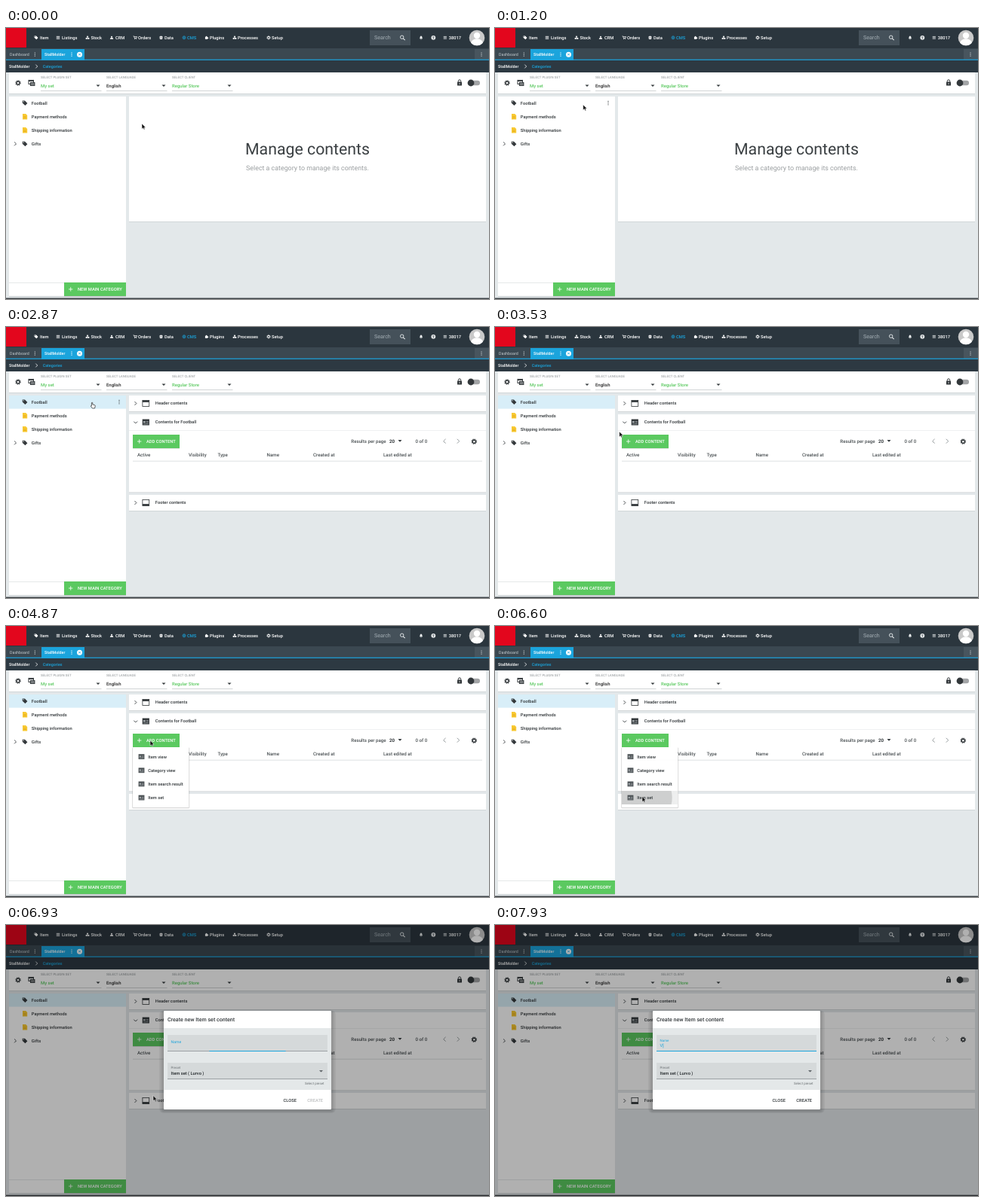
These frames come from a looping animation (640x360 px, 8 s). An HTML page:

```html
<!DOCTYPE html>
<html lang="en">
<head>
<meta charset="utf-8">
<title>Shop content manager</title>
<style>
html, body { margin: 0; height: 100%; overflow: hidden; background: #e3e8ea; }
#stage { display: block; width: 100%; height: 100%; }
text { font-family: Roboto, Arial, sans-serif; text-rendering: geometricPrecision; }
</style>
</head>
<body>
<svg id="stage" viewBox="0 0 640 360"></svg>
<script>
const LOOP = 8000, INK = '#33383b', CYAN = '#1ba4dc', GREEN = '#5bc960', PALE = '#e4e8e9';

// Drawing helpers
const rect = (x, y, w, h, fill, more = '') =>
  `<rect x="${x}" y="${y}" width="${w}" height="${h}" fill="${fill}" ${more}/>`;
const text = (x, y, label, fill = INK, size = 5.76, weight = 500, more = '') =>
  `<text x="${x}" y="${y}" fill="${fill}" font-size="${size}" font-weight="${weight}" ${more}>${label}</text>`;
const group = (id, body, more = '') => `<g id="${id}" ${more}>${body}</g>`;
const line = (d, color = INK, width = 1) =>
  `<path d="${d}" fill="none" stroke="${color}" stroke-width="${width}"/>`;
const circle = (x, y, r, fill, more = '') => `<circle cx="${x}" cy="${y}" r="${r}" fill="${fill}" ${more}/>`;
const dots = (x, y, color) => [-2.2, 0, 2.2].map(d => circle(x, y + d, .65, color)).join('');
const triangle = (x, y, color = INK) => `<path d="M${x - 2.5} ${y - 1.2}h5l-2.5 2.6z" fill="${color}"/>`;
const card = (x, y, w, h) => rect(x, y + .6, w, h, '#0002') + rect(x, y, w, h, '#fff');
const chevron = (x, y, color = INK) => line(`M${x - 1.2} ${y - 2.4}l2.4 2.4-2.4 2.4`, color, .9);

const shapes = {
  tag: c => `<path d="M-3.3-3.1H0L3.4.3.4 3.3-3.3-.2ZM-1.9-2.3a.6.6 0 1 0 .1 0Z" fill="${c}" fill-rule="evenodd"/>`,
  list: c => line('M-3-2h6M-3 0h6M-3 2h6', c, 1.1),
  boxes: c => rect(-1.4, -2.8, 2.8, 2.5, c) + rect(-3.1, .2, 2.8, 2.5, c) + rect(.3, .2, 2.8, 2.5, c),
  people: c => circle(0, -1.4, 1.4, c) + `<path d="M-3 2.7a3 2.7 0 0 1 6 0z" fill="${c}"/>`,
  cart: c => line('M-3.2-2.6h1.2l1.2 3.6h3.2l1-2.6h-4.6', c) + circle(-.6, 2.3, .7, c) + circle(2, 2.3, .7, c),
  disk: c => rect(-2.6, -2.8, 5.2, 5.6, c, 'rx="1.4"') + line('M-2.6-.8h5.2M-2.6 1h5.2', '#2b363e', .5),
  globe: c => circle(0, 0, 2.7, 'none', `stroke="${c}" stroke-width=".8"`) + line('M-2.7 0h5.4M0-2.7q-2.4 2.7 0 5.4q2.4-2.7 0-5.4', c, .6),
  puzzle: c => rect(-2.8, -1.3, 4.4, 4, c) + circle(-.6, -1.7, 1.2, c) + circle(2, .7, 1.1, c),
  gear: c => circle(0, 0, 1.9, 'none', `stroke="${c}" stroke-width="1.3"`) +
    circle(0, 0, 2.9, 'none', `stroke="${c}" stroke-width="1.2" stroke-dasharray="1.3 .98"`),
  sheet: () => `<path d="M-3-3.8H1.2L3.2-1.8V3.8H-3Z" fill="#f8c932"/>` + line('M-1.6 0h3.2M-1.6 1.7h3.2', '#d99b16', .6),
  search: c => circle(-.8, -.8, 2.2, 'none', `stroke="${c}"`) + line('M.8.8 3.2 3.2', c, 1.2),
  bell: c => `<path d="M-2.4 1.7Q-1.6 1-1.6-.6a1.6 2 0 0 1 3.2 0Q1.6 1 2.4 1.7Z" fill="${c}"/>` + circle(0, 2.3, .6, c),
  lock: c => rect(-3, -1.2, 6, 5, c, 'rx=".6"') + line('M-1.7-1v-1.3a1.7 1.7 0 0 1 3.4 0V-1', c) + circle(0, 1.2, .7, '#fff'),
  layers: c => rect(-4, -3.6, 6.5, 5, 'none', `stroke="${c}"`) + line('M-4-2.6h6.5', c, 1.2) + rect(-2, -1, 6.4, 5, c) +
    line('M-1 .7h4.4M-1 2.3h4.4', '#fff', .6),
  header: c => rect(-4.4, -4, 8.8, 8, 'none', `stroke="${c}" stroke-width=".8"`) + rect(-4.4, -4, 8.8, 2.4, c),
  footer: c => rect(-4.4, -4, 8.8, 8, 'none', `stroke="${c}" stroke-width=".8"`) + rect(-4.4, 1.6, 8.8, 2.4, c),
  content: c => rect(-4.6, -4, 9.2, 8, c) + rect(-3.4, -1.4, 2.8, 2.2, '#a9afb2') + line('M.4-1h3M.4.6h3M-3.4 2.4h6.8', '#a9afb2', .7)
};
const icon = (name, x, y, color = INK, scale = 1) =>
  `<g transform="translate(${x} ${y}) scale(${scale})">${shapes[name](color)}</g>`;
const button = (x, y, w, label) => rect(x, y + .6, w, 18, '#0003') + rect(x, y, w, 18, GREEN) +
  line(`M${x + 6} ${y + 9}h5.4m-2.7-2.7v5.4`, '#fff', .8) + text(x + 18, y + 11.1, label, '#fff');

function topBar() {
  const nav = [['tag', 40, 'Item', 45], ['list', 69, 'Listings', 74], ['boxes', 108, 'Stock', 112.5],
    ['people', 140, 'CRM', 145], ['cart', 171, 'Orders', 175], ['disk', 205.5, 'Data', 210],
    ['globe', 236, 'CMS', 240], ['puzzle', 266, 'Plugins', 270], ['boxes', 303, 'Processes', 307], ['gear', 348, 'Setup', 352]];
  return rect(0, 0, 640, 27, '#2b363e') + rect(0, 0, 27, 26, '#e3061d') +
    nav.map(([name, x, label, tx]) => {
      const color = label === 'CMS' ? CYAN : '#fff';
      return icon(name, x, 12.8, color, .75) + text(tx, 14.9, label, color);
    }).join('') +
    rect(482, 3, 54, 20, '#45515a') + text(488, 15.4, 'Search', '#a5afb5', 7.09, 400) + icon('search', 525.5, 13, '#dfe4e6') +
    icon('bell', 550, 12.8, '#e8ebec', .9) + circle(566.3, 12.8, 2.9, '#e8ebec') +
    text(566.3, 14.6, '?', '#2b363e', 5, 700, 'text-anchor="middle"') +
    icon('list', 581.8, 12.8, '#e8ebec', .7) + text(586.8, 14.9, '38017', '#fff') +
    circle(624, 13, 10.3, '#c9c9c9') +
    '<path d="M616.2 19.8a7.8 5.5 0 0 1 15.6 0a10.3 10.3 0 0 1-15.6 0z" fill="#fff"/>' + circle(624, 10, 4.2, '#fff') +
    group('avatarBlank', circle(624, 13, 10.3, '#a9a9a9')) +
    rect(0, 27, 640, 16, '#3b4851') + text(5, 37, 'Dashboard', '#c5ccd0', 5.32, 400) + dots(38.3, 35, '#c5ccd0') +
    rect(47, 28, 57, 15, CYAN) + text(51, 37, 'StallMolder', '#fff', 5.32) + dots(87, 35, '#fff') +
    circle(97.5, 35.2, 3.5, '#fff') + line('M96.2 33.9l2.6 2.6m0-2.6-2.6 2.6', CYAN, .8) +
    rect(621, 28, 19, 14, '#48555e') + dots(630, 35, '#c5ccd0') +
    rect(0, 43, 640, 16, '#2d3942') + rect(0, 41.6, 640, 1.2, CYAN) +
    text(4, 52.8, 'StallMolder', '#fff', 5.32) + chevron(40.5, 51, '#dfe4e6') + text(48.7, 52.8, 'Categories', CYAN, 5.32);
}

function toolbar() {
  const selects = [[46, 'PLUGIN SET', 'My set', GREEN], [133, 'LANGUAGE', 'English', '#222'], [220, 'CLIENT', 'Regular Store', GREEN]];
  return card(4, 59, 632, 28) + icon('gear', 16, 73, INK, 1.05) + icon('layers', 34, 73) +
    selects.map(([x, label, value, color]) => text(x, 67.4, 'SELECT ' + label, '#8d9295', 4.43, 400) +
      text(x, 79, value, color, 5.95) + rect(x, 83.2, 80.5, .6, '#b5b9bb') + triangle(x + 76, 76.6)).join('') +
    icon('lock', 601, 72.8) + rect(612, 69.8, 16, 6.4, '#a3a5a7', 'rx="3.2"') + circle(616, 73, 4.4, INK);
}

const rowY = i => 99.6 + 18.1 * i;
function sidebar() {
  const rows = [['tag', 'Football'], ['sheet', 'Payment methods'], ['sheet', 'Shipping information'], ['tag', 'Gifts']];
  return card(4, 91, 155, 265) + group('rowHover', rect(4, -9, 155, 18, '#f4f5f5')) +
    group('rowSelected', rect(4, 91, 155, 17.6, '#d8eef8')) + group('rowDots', dots(150, 0, INK)) +
    rows.map(([name, label], i) => icon(name, 25, rowY(i)) + text(33.8, rowY(i) + 2, label)).join('') +
    chevron(12.3, rowY(3)) + rect(4, 338, 73, .6, '#d5d9da') + button(77, 338, 82, 'NEW MAIN CATEGORY');
}

const panel = (y, h, name, label) =>
  card(163, y, 473, h) + icon(name, 185.3, y + 10.5) + text(197.8, y + 12.4, label);
function contents() {
  const columns = [[174, 'Active'], [242, 'Visibility'], [280.5, 'Type'], [345.5, 'Name'], [407, 'Created at'], [500, 'Last edited at']];
  return panel(91, 21, 'header', 'Header contents') + chevron(171.7, 101.5) +
    panel(116, 103.5, 'content', 'Contents for Football') + group('openArrow', chevron(0, 0)) +
    rect(163, 137, 473, .5, '#dfe3e4') + button(168, 143, 62, 'ADD CONTENT') +
    `<svg x="168" y="143" width="62" height="18">${circle(23, 10, 1, '#fff', 'id="buttonRipple"')}</svg>` +
    text(457.3, 153.6, 'Results per page', '#4c5255', 6.2) + text(508, 153.6, '20', INK, 6.2, 700) + triangle(522, 151.3) +
    text(542.5, 153.6, '0 of 0', '#4c5255', 6.2) +
    line('M582.6 148.8l-2.9 2.9 2.9 2.9M597.8 148.8l2.9 2.9-2.9 2.9', '#8b9194', .9) + icon('gear', 620.3, 152.2, INK, 1.05) +
    columns.map(([x, label]) => text(x, 172.2, label, '#4c5255', 6.2)).join('') + rect(168, 177.8, 463, .6, '#c6cacc') +
    group('busy', rect(163, 137.4, 473, 82.2, '#0000002e') + group('spinner', rect(-1.8, -3.4, 3.6, 6.8, CYAN))) +
    panel(223, 21, 'footer', 'Footer contents') + chevron(171.7, 233.5);
}

const menuY = i => 173.6 + 18.15 * i;
function menu() {
  return rect(167, 161.5, 76.5, 81, '#0001', 'rx="1"') + rect(167.5, 161.5, 75.3, 80.2, '#0002', 'rx="1"') +
    rect(168, 161, 74.3, 80, '#fff', 'rx=".8"') + group('menuHover', rect(168, -9, 74.3, 18, '#eeefef')) +
    `<svg x="168" y="219" width="74.3" height="18">${circle(27, 9, 1, '#0002', 'id="menuRipple"')}</svg>` +
    ['Item view', 'Category view', 'Item search result', 'Item set'].map((label, i) =>
      icon('content', 179.5, menuY(i), '#4b5154', .85) + text(188.2, menuY(i) + 2, label)).join('');
}

function dialog() {
  const shadow = [6, 4, 2].map(d => rect(209 - d, 116 - d / 2, 222 + 2 * d, 131 + d, '#0000000f', `rx="${d}"`)).join('');
  return shadow + rect(209, 114, 222, 131, '#fff', 'rx="1"') + text(214, 127.7, 'Create new Item set content', INK, 7.09) +
    rect(209, 137, 222, 82, PALE) + rect(214, 146, 212, 22, '#d5d9da') + rect(214, 167.4, 212, .6, '#777d80') +
    rect(214, 183, 212, 22, '#d5d9da') + rect(214, 204.4, 212, .6, '#777d80') +
    group('nameLine', rect(-106, 167, 212, 1, CYAN)) + text(0, 0, 'Name', '#6a7073', 5.76, 400, 'id="nameLabel"') +
    text(218.6, 162.4, 'V', CYAN, 5.76, 400, 'id="typed"') + rect(0, 157.4, .6, 6, CYAN, 'id="caret"') +
    text(218.6, 191, 'Preset', '#6a7073', 4.43, 400) + text(218.6, 199, 'Item set ( Lurvo )', '#22272a') + triangle(417.5, 194.2, '#5d6366') +
    text(421.5, 211.7, 'Select preset', '#6a7073', 4.43, 400, 'text-anchor="end"') +
    text(367.5, 234.6, 'CLOSE') + text(399.3, 234.6, 'CREATE', INK, 5.76, 500, 'id="create"');
}

const stage = document.getElementById('stage');
stage.innerHTML = rect(0, 0, 640, 360, '#e3e8ea') + topBar() + toolbar() + sidebar() +
  group('welcome', card(163, 91, 473, 166) +
    text(399.5, 168, 'Manage contents', '#3b4043', 21.3, 400, 'text-anchor="middle"') +
    text(399.5, 188.6, 'Select a category to manage its contents.', '#9a9ea0', 8.86, 400, 'text-anchor="middle"')) +
  group('contents', contents()) + rect(0, 358.6, 640, 1.4, '#3a4044') +
  group('menu', menu()) + group('shade', rect(0, 0, 640, 360, '#000')) + group('dialog', dialog()) +
  group('cursor',
    group('arrow', '<path d="M0 0V7.2L1.7 5.7 2.8 8 4 7.4 3 5.2H5.1Z" fill="#111" stroke="#fff" stroke-width=".5"/>') +
    group('hand', '<path d="M1.4 4.8V.9a.7.7 0 0 1 1.4 0V3l2.6.6q1 .3.8 1.4L5.6 8H2.5L.3 5.2Q.4 4.2 1.4 4.8Z" fill="#fff" stroke="#222" stroke-width=".7"/>'));

const el = {};
stage.querySelectorAll('[id]').forEach(node => el[node.id] = node);
const set = (id, name, value) => el[id].setAttribute(name, value);
const fade = (id, opacity) => set(id, 'opacity', +opacity);
const move = (id, value) => set(id, 'transform', value);

// Timing helpers
const progress = (t, from, to) => Math.min(1, Math.max(0, (t - from) / (to - from)));
const easeInOut = p => p * p * (3 - 2 * p);
const easeOut = p => 1 - (1 - p) ** 3;
const mix = (a, b, p) => a + (b - a) * p;

const moves = [[530, 1330, 112, 100], [2870, 3670, 169.3, 142.3], [3670, 4000, 191, 152], [5400, 5930, 195, 226.5]];
function cursorAt(t) {
  return moves.reduce(([x, y], [from, to, tx, ty]) => {
    const p = easeInOut(progress(t, from, to));
    return [mix(x, tx, p), mix(y, ty, p)];
  }, [180, 127]);
}

function draw(t) {
  const [x, y] = cursorAt(t), loaded = t >= 1930;
  const onHand = t >= 1400 && t < 2900;
  move('cursor', `translate(${x} ${y})`);
  fade('cursor', t < 7800);
  fade('arrow', !onHand);
  fade('hand', onHand);

  const row = x < 159 ? Math.floor((y - 90.6) / 18.1) : -1;
  fade('rowDots', row >= 0);
  fade('rowHover', row > 0);
  move('rowDots', `translate(0 ${rowY(row)})`);
  move('rowHover', `translate(0 ${rowY(row)})`);
  fade('rowSelected', loaded);
  fade('avatarBlank', loaded && t < 2870);

  fade('welcome', !loaded);
  fade('contents', loaded);
  fade('busy', 1 - progress(t, 2030, 2130));
  move('spinner', `translate(413.6 185.3) rotate(${20 + (t - 1930) * .6})`);
  move('openArrow', `translate(171.7 126.8) rotate(${mix(45, 90, progress(t, 1930, 2070))})`);

  const press = progress(t, 4470, 4870);
  set('buttonRipple', 'r', 48 * easeOut(press));
  fade('buttonRipple', press > 0 ? .25 * (1 - press) : 0);

  const open = easeOut(progress(t, 4500, 4720));
  fade('menu', open * (1 - progress(t, 6600, 6760)));
  move('menu', `translate(168 161) scale(${mix(.8, 1, open)}) translate(-168 -161)`);
  const item = Math.floor((y - 164.5) / 18.15);
  fade('menuHover', item >= 0 && t > 5400);
  move('menuHover', `translate(0 ${menuY(item)})`);
  set('menuRipple', 'r', 55 * progress(t, 6500, 6640));

  const appear = easeOut(progress(t, 6630, 6790));
  fade('shade', .31 * appear);
  fade('dialog', appear);
  move('dialog', `translate(320 179.5) scale(${mix(.7, 1, appear)}) translate(-320 -179.5)`);
  const focus = easeInOut(progress(t, 6800, 7070));
  move('nameLabel', `translate(218.6 ${mix(159.8, 154.8, focus)}) scale(${mix(1, .77, focus)})`);
  set('nameLabel', 'fill', focus > .3 ? CYAN : '#6a7073');
  move('nameLine', `translate(320 0) scale(${focus} 1)`);
  fade('nameLine', focus > 0);
  const typed = t >= 7800;
  fade('typed', typed);
  fade('caret', focus === 1);
  set('caret', 'x', typed ? 222.6 : 218.6);
  fade('create', mix(.32, 1, progress(t, 7780, 7920)));
}

const start = performance.now();
function tick() {
  draw((performance.now() - start) % LOOP);
  requestAnimationFrame(tick);
}
tick();
</script>
</body>
</html>
```
